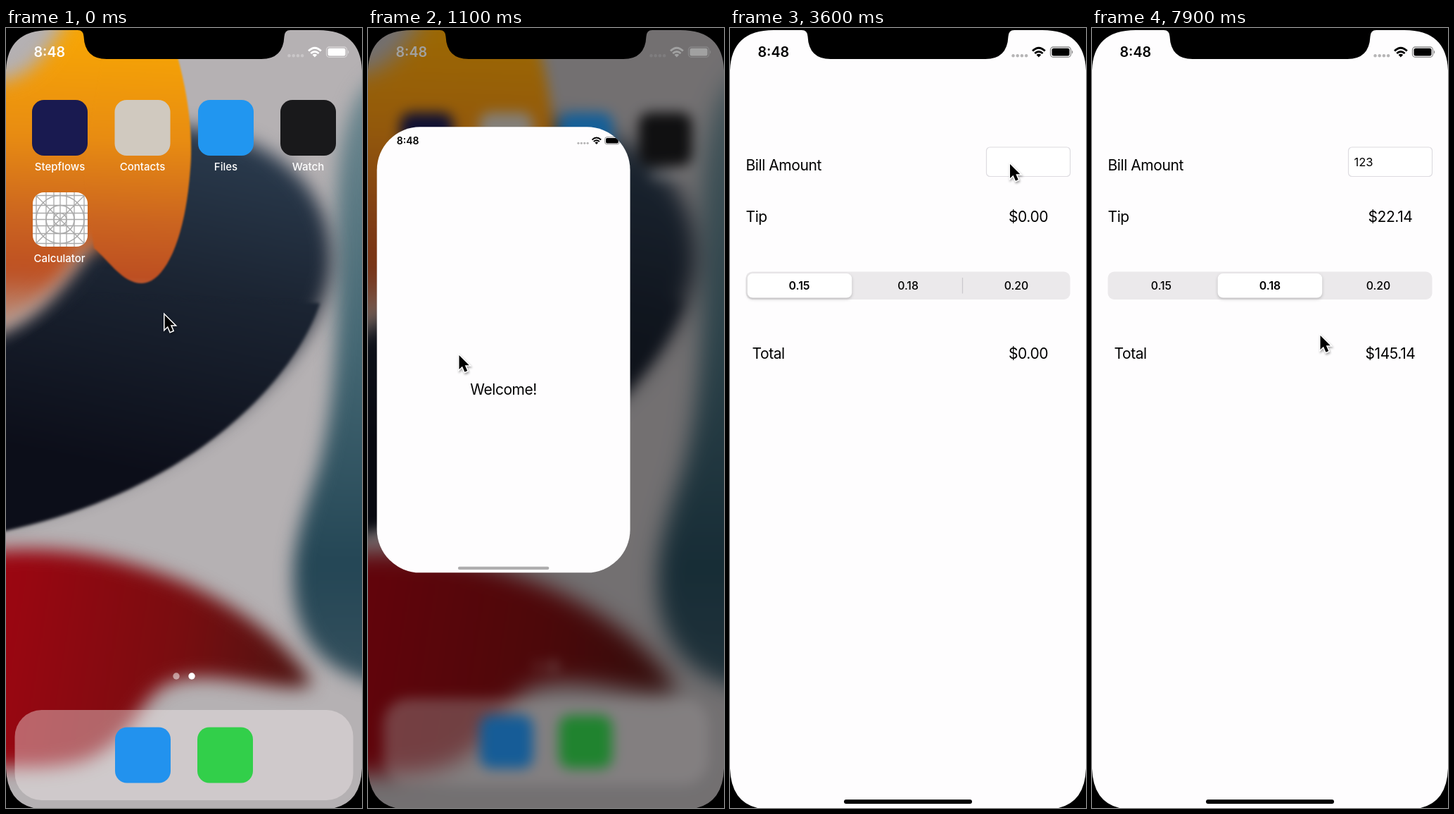
An HTML page that plays this animation: 506x1106 px, repeating every 8 s.

```html
<!DOCTYPE html>
<html lang="en">
<head>
<meta charset="utf-8">
<title>Tip calculator</title>
<style>
html, body { margin: 0; width: 100%; height: 100%; overflow: hidden; background: #000; }
svg { display: block; width: 506px; height: 1106px; font-family: Inter, Roboto, sans-serif; }
.soft { filter: blur(13px); }
.mid { text-anchor: middle; }
.label { font-size: 15px; font-weight: 500; fill: #fff; }
.body { font-size: 21px; letter-spacing: -.02em; }
.seg { font-size: 15.8px; font-weight: 500; text-anchor: middle; }
#cursor { filter: drop-shadow(1px 2px 1.5px rgba(0,0,0,.35)); }
#thumb { filter: drop-shadow(0 2px 2px rgba(0,0,0,.2)); }
</style>
</head>
<body>
<svg viewBox="0 0 506 1106">
  <defs>
    <linearGradient id="navy" gradientUnits="userSpaceOnUse" x1="330" y1="150" x2="230" y2="640">
      <stop stop-color="#2b3c4f"/><stop offset=".45" stop-color="#1b2432"/><stop offset="1" stop-color="#0c0e19"/>
    </linearGradient>
    <linearGradient id="orange" gradientUnits="userSpaceOnUse" x1="150" y1="20" x2="135" y2="410">
      <stop stop-color="#f6a405"/><stop offset=".35" stop-color="#e88c12"/><stop offset=".65" stop-color="#cb6420"/>
      <stop offset=".85" stop-color="#bd4f22"/><stop offset="1" stop-color="#b98a76"/>
    </linearGradient>
    <linearGradient id="red" gradientUnits="userSpaceOnUse" x1="0" y1="850" x2="440" y2="920">
      <stop stop-color="#9a0611"/><stop offset=".55" stop-color="#790d10"/><stop offset="1" stop-color="#4a1512"/>
    </linearGradient>
    <linearGradient id="teal" x2="0" y2="1">
      <stop stop-color="#708a92"/><stop offset=".45" stop-color="#446773"/><stop offset=".8" stop-color="#244655"/><stop offset="1" stop-color="#35505d"/>
    </linearGradient>
    <clipPath id="gridClip"><rect x="38" y="233" width="78" height="77" rx="16"/></clipPath>
    <clipPath id="appClip"><rect id="appShape"/></clipPath>
    <g id="status">
      <text x="39.500" y="41" font-size="19.700" font-weight="600">8:48</text>
      <g opacity=".28"><circle cx="402.500" cy="39.200" r="2.200"/><circle cx="408.700" cy="39.200" r="2.200"/><circle cx="414.900" cy="39.200" r="2.200"/><circle cx="421.100" cy="39.200" r="2.200"/></g>
      <g fill="none" stroke="currentColor" stroke-width="2.700">
        <path d="M430 32.500Q438.800 24 447.800 32.500M433.200 36Q438.800 31 444.600 36"/>
      </g>
      <path d="M435.500 38Q438.800 35.300 442.200 38L438.800 41.500Z"/>
      <rect x="455.500" y="27" width="29" height="14.300" rx="4" fill="none" stroke="currentColor" stroke-opacity=".45" stroke-width="1.300"/>
      <rect x="457.500" y="28.800" width="25" height="10.700" rx="2.500"/>
      <path d="M486 31.500Q488.500 34 486 36.800Z" opacity=".5"/>
    </g>
  </defs>

  <g id="home">
    <g id="blurred">
      <g id="wall">
        <rect x="-60" y="-60" width="626" height="1226" fill="#b5b1b3"/>
        <path class="soft" fill="url(#teal)" d="M560 60C490 60 468 160 470 290C472 440 468 530 445 620C420 700 400 750 412 820C425 885 470 925 560 935Z"/>
        <path class="soft" fill="url(#navy)" d="M200 140C350 130 470 210 462 340C450 470 260 650 -40 705V440C50 425 90 350 130 300Z"/>
        <path fill="url(#navy)" style="filter:blur(2px)" d="M-30 480L120 380L446 390C410 500 260 665 -30 719Z"/>
        <path class="soft" fill="url(#orange)" d="M-40 75C30 85 60 40 100 -40H200V310H115C90 335 50 410 -40 435Z"/>
        <path fill="url(#orange)" style="filter:blur(1px)" d="M150 -30H218C250 40 268 130 262 200C254 310 222 362 193 362C166 362 148 332 125 312L110 200Z"/>
        <path class="soft" fill="url(#red)" d="M-50 745C60 730 150 745 250 785C330 820 400 870 436 930C400 950 300 905 235 928C190 945 190 1000 120 1035C70 1055 0 1045 -50 1050Z"/>
      </g>
      <g id="icons">
        <rect x="12.500" y="967" width="481" height="128" rx="38" fill="#f4eeee" opacity=".4"/>
        <circle cx="242" cy="919" r="4.700" fill="#fff" opacity=".5"/>
        <circle cx="264" cy="919" r="4.700" fill="#fff"/>
        <g id="apps"></g>
        <g clip-path="url(#gridClip)">
          <rect x="38" y="233" width="78" height="77" fill="#fff"/>
          <path id="grid" fill="none" stroke="#a9a9a9" stroke-width="1.300"/>
          <g fill="none" stroke="#a9a9a9" stroke-width="1.500" transform="translate(77 271.500)"><circle r="9"/><circle r="20"/><circle r="34"/></g>
        </g>
      </g>
    </g>
    <use href="#status" fill="#fff" color="#fff"/>
    <rect id="dim" width="506" height="1106"/>
  </g>

  <g id="app" clip-path="url(#appClip)">
    <rect width="506" height="1106" fill="#fefdfe"/>
    <g id="content">
      <use href="#status" fill="#000" color="#000"/>
      <text id="welcome" class="mid" x="253" y="540" font-size="29.500" letter-spacing="-.02em">Welcome!</text>
      <g id="form">
        <text class="body" x="22.500" y="202">Bill Amount</text>
        <text class="body" x="22.500" y="274.500">Tip</text>
        <text class="body" x="31.500" y="468.500">Total</text>
        <text id="tip" class="body mid" x="424" y="274.500"></text>
        <text id="total" class="body mid" x="424" y="468.500"></text>
        <rect x="364.500" y="169" width="119" height="41.500" rx="5" fill="#fff" stroke="#dddbe0" stroke-width="1.200"/>
        <text id="bill" x="372.500" y="196" font-size="16.500"></text>
        <rect id="caret" y="178" width="2.200" height="23" rx="1" fill="#2d6be0"/>
        <rect x="22.500" y="345.500" width="461" height="39.500" rx="9" fill="#ebe9eb"/>
        <path id="divider" d="M330.500 354V376.500" stroke="#cbc9cd" stroke-width="1.300"/>
        <rect id="thumb" y="348" width="148.500" height="34.500" rx="7.500" fill="#fff"/>
        <text class="seg" x="98.500" y="371">0.15</text>
        <text class="seg" x="253" y="371">0.18</text>
        <text class="seg" x="407" y="371">0.20</text>
      </g>
    </g>
    <rect id="bar"/>
  </g>

  <path fill-rule="evenodd" d="M-2 -2H508V1108H-2ZM0 60Q2 3 62 3H102Q110 3 110.500 12Q112 44 143 44H363Q394 44 395.500 12Q396 3 404 3H444Q504 3 506 60V1050Q504 1108 448 1108H58Q2 1108 0 1050Z"/>
  <path id="cursor" d="M1.500 3V23L6 18.700L9.500 26.700L13.200 25.100L9.800 17.200H15.800Z" stroke="#fff" stroke-width="3" paint-order="stroke"/>
</svg>
<script>
const $ = id => document.getElementById(id);
const set = (id, attrs) => { for (const k in attrs) $(id).setAttribute(k, attrs[k]); };
const clamp = v => Math.max(0, Math.min(1, v));
const ramp = (t, a, b) => clamp((t - a) / (b - a));
const smooth = u => u * u * (3 - 2 * u);
const mix = (a, b, u) => a + (b - a) * u;
const money = v => '$' + v.toFixed(2);

// x, y, colour, label
const apps = [
  [37, 102, '#191a50', 'Stepflows'], [154.5, 102, '#d0c9bf', 'Contacts'],
  [273, 102, '#2196f0', 'Files'], [390, 102, '#19191b', 'Watch'],
  [155, 991.5, '#2292ee'], [272, 991.5, '#32cf4a']
];
const label = (x, y, s) => `<text class="label mid" x="${x}" y="${y}">${s}</text>`;
$('apps').innerHTML = apps.map(([x, y, color, name]) =>
  `<rect x="${x}" y="${y}" width="79" height="79" rx="17" fill="${color}"/>` +
  (name ? label(x + 39.5, 201.5, name) : '')).join('') + label(76, 331.5, 'Calculator');

let lines = 'M38 233L116 310M116 233L38 310';
for (const d of [-34, -20, -9, 0, 9, 20, 34])
  lines += `M${77 + d} 233V310M38 ${271.5 + d}H116`;
$('grid').setAttribute('d', lines);

// time, x, y of the pointer
const path = [
  [0, 224, 404], [600, 96, 311], [850, 96, 304], [1100, 128, 461], [1500, 248, 968],
  [1900, 250, 966], [2600, 384, 225], [2700, 386, 221], [3000, 391, 203],
  [3400, 391, 203], [3600, 396.5, 190], [6650, 396.5, 190], [7200, 296, 362],
  [7400, 298, 368], [7900, 323, 433]
];
function pointer(t) {
  const i = Math.max(1, path.findIndex(k => k[0] >= t));
  const [a, b] = [path[i - 1], path[i]];
  const u = smooth(ramp(t, a[0], b[0]));
  return [mix(a[1], b[1], u), mix(a[2], b[2], u)];
}

function draw(t) {
  // the app grows out of its icon
  const p = 1 - Math.pow(1 - ramp(t, 820, 1520), 2.1);
  const x = mix(37, 0, p), w = mix(79, 506, p), scale = w / 506;
  const y = mix(233, 0, Math.pow(p, 2.2));
  const h = mix(311, 1106, Math.pow(p, 1.3)) - y;
  set('appShape', { x, y, width: w, height: h, rx: p < 1 ? 18 + 47 * clamp(p * 1.4) : 0 });
  set('app', { opacity: ramp(t, 820, 920) });
  set('content', { transform: `translate(${x} ${y - 14 * (1 - p)}) scale(${scale})` });
  set('bar', {
    x: x + 162 * scale, y: y + h - 12 * scale, width: 182 * scale, height: 6 * scale,
    rx: 3 * scale, opacity: clamp(p * 2 - 1)
  });
  $('home').style.display = p < 1 ? '' : 'none';
  $('blurred').style.filter = p ? `blur(${Math.min(9, 14 * p)}px)` : 'none';
  const zoom = s => `translate(253 553) scale(${s}) translate(-253 -553)`;
  set('wall', { transform: zoom(1 + .03 * p) });
  set('icons', { transform: zoom(1 - .06 * p) });
  set('dim', { opacity: .56 * p });

  // launch screen gives way to the form
  const shown = ramp(t, 1200, 1540);
  set('welcome', { opacity: 1 - shown });
  set('form', { opacity: shown });

  // typing
  const typed = (t >= 4500) + (t >= 4600) + (t >= 5100);
  $('bill').textContent = '123'.slice(0, typed);
  set('caret', {
    x: [372.5, 380, 389.3, 400.6][typed],
    opacity: ramp(t, 3850, 4000) - ramp(t, 5350, 5500) + ramp(t, 5650, 5800)
      - ramp(t, 5950, 6100) + ramp(t, 6700, 6800) - ramp(t, 7600, 7800)
  });

  // choosing the second rate
  const slide = smooth(ramp(t, 7250, 7650));
  const chosen = t >= 7350;
  set('thumb', { x: 24.7 + 154 * slide });
  set('divider', { opacity: 1 - slide });
  document.querySelectorAll('.seg').forEach((s, i) => s.style.fontWeight = i === +chosen ? 600 : 500);
  const bill = chosen ? 123 : 0, tip = bill * .18;
  $('tip').textContent = money(tip);
  $('total').textContent = money(bill + tip);

  set('cursor', { transform: `translate(${pointer(t)})` });
}

function frame() {
  draw(Math.floor(performance.now() % 8000 / 100) * 100);
  requestAnimationFrame(frame);
}
frame();
</script>
</body>
</html>
```
